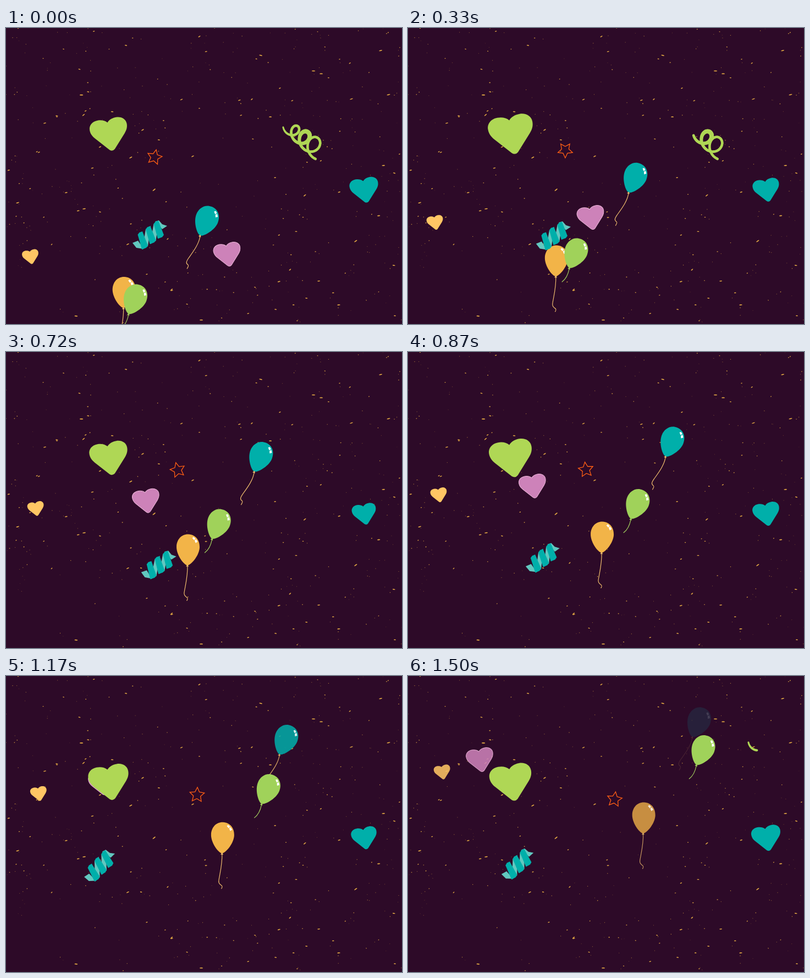
Animation of 720x540 px, one loop 1.53 s. Source, as an HTML page with a canvas:

```html
<!DOCTYPE html>
<html lang="en">
<head>
<meta charset="utf-8">
<title>Party</title>
<style>
  html, body { margin: 0; width: 100%; height: 100%; overflow: hidden; background: #2d0a28; }
  canvas { display: block; }
</style>
</head>
<body>
<canvas id="stage" width="720" height="540"></canvas>
<script>
const ctx = document.getElementById('stage').getContext('2d');
const LOOP = 1530, STEP = 30, TRAVEL = 1500;
const BG = '#2d0a28', TEAL = '#00afaa', LIME = '#afd755', GOLD = '#f2b448', CORD = '#f0be6e';

const clamp = v => Math.max(0, Math.min(1, v));
const mix = (a, b, u) => a + (b - a) * u;
const smooth = u => u * u * (3 - 2 * u);
const easeOut = (t, power) => 1 - (1 - t / TRAVEL) ** power;
const fade = (t, start) => clamp(1 - (t - start) / 457);
const pulse = (t, low, high, period, trough) =>
  mix(low, high, (1 - Math.cos((t - trough) / period * 2 * Math.PI)) / 2);

// Straight flight that slows down
const flight = (x1, y1, x2, y2, power) => t => {
  const u = easeOut(t, power);
  return [mix(x1, x2, u), mix(y1, y2, u)];
};
const fly = {
  teal: flight(363.8, 352, 527.8, 84.5, 1.4),
  gold: flight(214.5, 482, 428.5, 258.5, 1.2),
  green: flight(233.8, 495, 535.3, 135.5, 1.07),
  pink: flight(401.5, 412.5, 130, 152.5, 1.2),
  amber: flight(44, 417, 61.7, 175, 1.2)
};

function at([x, y], degrees, draw) {
  ctx.save();
  ctx.translate(x, y);
  ctx.rotate(degrees * Math.PI / 180);
  draw();
  ctx.restore();
}

function poly(points, fill) {
  ctx.beginPath();
  points.forEach(p => ctx.lineTo(...p));
  ctx.closePath();
  ctx.fillStyle = fill;
  ctx.fill();
}

// Gold dust, thinner in the middle and at the lower left
function makeSpecks(count) {
  let seed = 77;
  const rand = () => (seed = seed * 16807 % 2147483647) / 2147483647;
  const specks = [];
  while (specks.length < count) {
    const x = rand() * 720, y = rand() * 540, size = rand();
    const sparse = Math.hypot((x - 400) / 130, (y - 260) / 100) < 1 || (x < 300 && y > 420);
    if (sparse && rand() < 0.7) continue;
    specks.push({ x, y, w: 1 + 5.5 * size ** 5, h: 0.9 + 0.9 * size, tilt: rand() * 60 - 40, alpha: 0.3 + 0.65 * size });
  }
  return specks;
}
const specks = makeSpecks(480);

function drawSpecks() {
  ctx.fillStyle = '#f0b545';
  for (const s of specks) {
    ctx.globalAlpha = s.alpha;
    at([s.x, s.y], s.tilt, () => {
      ctx.beginPath();
      ctx.ellipse(0, 0, s.w / 2, s.h / 2, 0, 0, 2 * Math.PI);
      ctx.fill();
    });
  }
  ctx.globalAlpha = 1;
}

const heartShape = new Path2D(
  'M0-.32C.06-.39.15-.42.25-.42C.39-.42.5-.33.5-.2C.5-.1.46-.03.4.04L.07.41Q0 .47-.07.41' +
  'L-.4.04C-.46-.03-.5-.1-.5-.2C-.5-.33-.39-.42-.25-.42C-.15-.42-.06-.39 0-.32Z');

function heart([x, y], width, fill, alpha = 1, edge = fill) {
  at([x + width * 0.033, y + width * 0.015], -10, () => {
    ctx.scale(width, width);
    ctx.globalAlpha = alpha;
    ctx.fillStyle = fill;
    ctx.fill(heartShape);
    if (edge !== fill) {
      ctx.strokeStyle = edge;
      ctx.lineWidth = 1 / width;
      ctx.stroke(heartShape);
    }
  });
}

const bodyShape = new Path2D('M0-28C13-28 21-17.500 21-5C21 9 9 25 1.500 28.500L-1.500 28.500C-9 25-21 9-21-5C-21-17.500-13-28 0-28Z');
const strings = {
  long: new Path2D('M-11 28C-13 43-25 58-32 68C-36 74-37 77-33.500 79.500C-30.500 82-33 83-34.500 87'),
  straight: new Path2D('M-1 28C0 46-4 62-6.500 76C-8 82-6 84-3 86.500C1 89-1 91-2 93'),
  short: new Path2D('M-11 28C-13 38-16 46-24 52')
};

function balloon(where, tilt, fill, string, cord, alpha = 1) {
  at(where, 0, () => {
    ctx.globalAlpha = alpha;
    ctx.strokeStyle = cord;
    ctx.lineWidth = 1.2;
    ctx.stroke(string);
    ctx.rotate(tilt * Math.PI / 180);
    ctx.fillStyle = fill;
    ctx.fill(bodyShape);
    poly([[0, 27], [2.5, 31], [-2.5, 31]], cord);
    poly([[7, -21.5], [9.5, -23.5], [13, -20.5], [10.5, -17.5]], '#fff');
    poly([[11.5, -17], [14, -19.5], [17, -15], [13.5, -12.5]], '#fff');
  });
}

function drawStar(t) {
  const u = t / TRAVEL;
  const where = [mix(270, 375.5, u ** 1.25), 214.7 + 61 * (u - 0.587) ** 2];
  at(where, mix(13, 80, easeOut(t, 1.7)), () => {
    ctx.beginPath();
    for (let i = 0; i < 10; i++) {
      const r = i % 2 ? 6.8 : 14, a = i * Math.PI / 5;
      ctx.lineTo(r * Math.sin(a), -r * Math.cos(a));
    }
    ctx.closePath();
    ctx.strokeStyle = '#ff5f14';
    ctx.lineWidth = 1.3;
    ctx.stroke();
  });
}

// The ribbon swings between resting poses: time, x, y
const swing = [[0, 262, 378], [250, 262, 378], [620, 286, 392], [1270, 163, 343.5], [1830, 263, 343.5]];

function drawRibbon(t) {
  const i = swing.findIndex(pose => pose[0] > t);
  const [[t1, x1, y1], [t2, x2, y2]] = [swing[i - 1], swing[i]];
  const u = smooth((t - t1) / (t2 - t1)), x = mix(x1, x2, u);
  const light = '#62c8c0';
  const shift = (points, k) => points.map(([px, py]) => [px + 14.5 * k, py - 9.8 * k]);
  at([x, mix(y1, y2, u)], (x - 262) * 0.12, () => {
    poly([[-32, 14], [-22, 10], [-12, 25], [-25, 23]], light);
    poly([[9, -25], [16, -27], [22, -20], [31, -17], [22, -11]], light);
    for (let k = 0; k < 2; k++) poly(shift([[-14, 26], [-4, 20], [1, -17], [-8, -11]], k), light);
    for (let k = 0; k < 3; k++) {
      poly(shift([[-22.5, -1], [-19.5, -5], [-14, -7], [-4, 19], [-7, 23], [-15, 26]], k), TEAL);
    }
  });
}

// Curly streamer: widening turns along a slanted line, n counts the turns
const TURNS = 3.2;
function curlPoint(n) {
  const angle = Math.PI * (1 - 2 * n), r = 9.6 + 2.15 * n;
  return [513.5 + 17 * n + r * Math.cos(angle), 181 + 12.7 * n + 1.1 * r * Math.sin(angle)];
}
function curl(from, to, dx, dy) {
  const step = 0.03;
  ctx.strokeStyle = LIME;
  ctx.lineCap = 'round';
  for (let n = from; n < to; n += step) {
    const [x1, y1] = curlPoint(n), [x2, y2] = curlPoint(Math.min(to, n + step));
    ctx.lineWidth = 3 + 1.5 * clamp(n * 3) + 3.5 * Math.exp(-(((n - 1.6) / 0.35) ** 2));
    ctx.beginPath();
    ctx.moveTo(x1 + dx, y1 + dy);
    ctx.lineTo(x2 + dx, y2 + dy);
    ctx.stroke();
  }
}
function drawCurls(t) {
  curl(TURNS * clamp((t - 210) / 375), TURNS, 0, 0);
  curl(0, 0.27 * clamp((t - 1420) / 80), 115, -60);
}

function render(t) {
  ctx.fillStyle = BG;
  ctx.fillRect(0, 0, 720, 540);
  drawSpecks();
  heart(fly.pink(t), 49, '#cd82b9', fade(t, 1440), '#ebb4d7');
  heart([186, 193], pulse(t, 68.5, 82, 655, 0), LIME);
  heart(fly.amber(t), 30, '#ffc664', fade(t, 1440));
  heart([650.5, 295], pulse(t, 44, 53.7, 530, 735), TEAL);
  drawStar(t);
  balloon(fly.teal(t), 22, TEAL, strings.long, CORD, fade(t, 1104));
  balloon(fly.gold(t), 2, GOLD, strings.straight, CORD, fade(t, 1400));
  balloon(fly.green(t), 22, '#a0d25a', strings.short, '#a5d25f');
  drawRibbon(t);
  drawCurls(t);
}

const start = performance.now();
function tick() {
  const t = (performance.now() - start) % LOOP;
  render(Math.floor(t / STEP) * STEP);
  requestAnimationFrame(tick);
}
tick();
</script>
</body>
</html>
```
